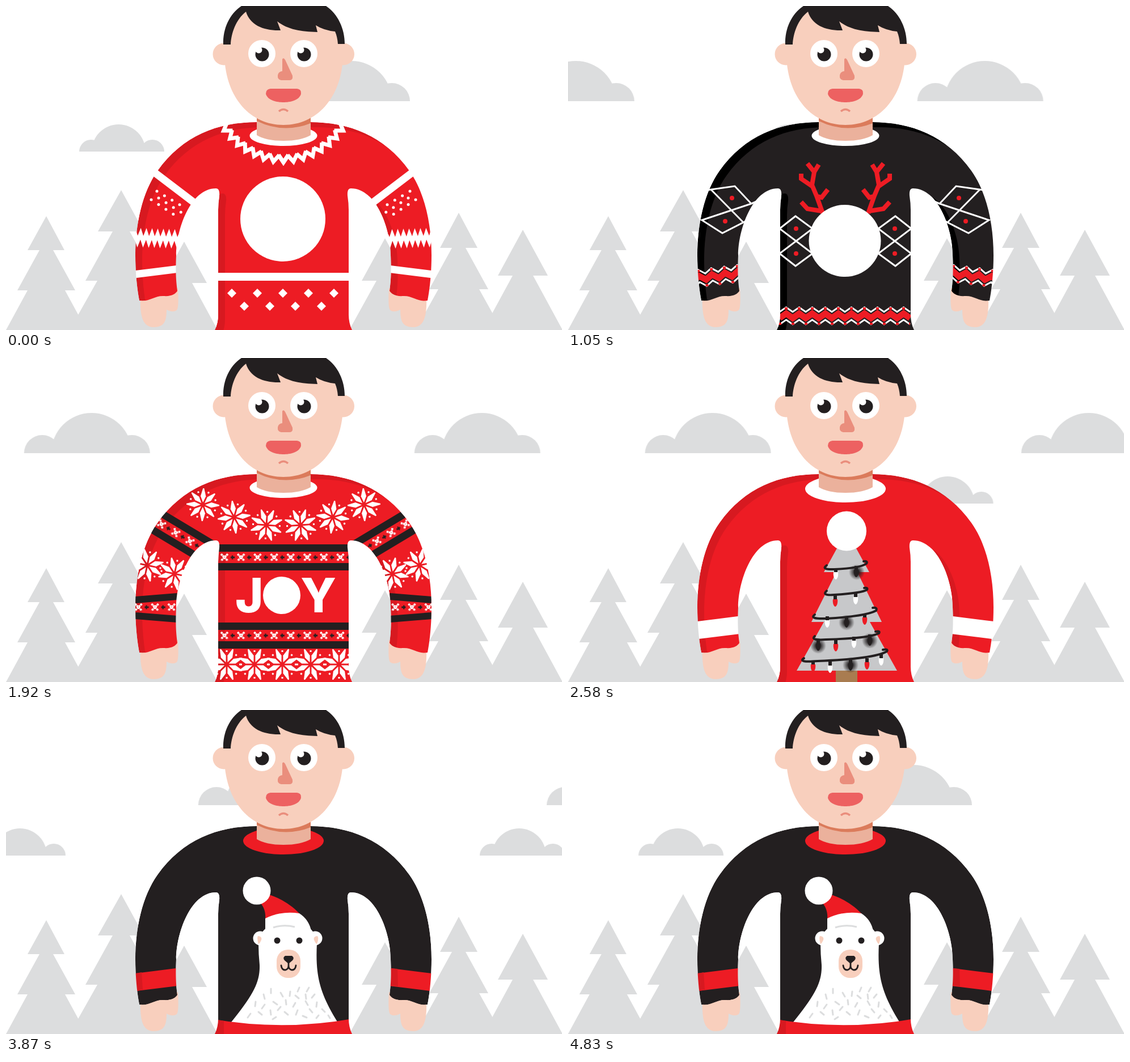
Recreate the animation shown at these times as an HTML page without scripts. Size 980 px wide and 572 px high, loop 4860 ms.

```html
<!DOCTYPE html>
<html lang="en">
<head>
<meta charset="utf-8">
<title>Festive sweaters</title>
<style>
html, body { margin: 0; height: 100%; overflow: hidden; background: #fff; }
svg { display: block; width: 100vw; height: 100vh; }
text { font-family: Inter, sans-serif; font-weight: 800; fill: #fff; }
.mirror { transform: matrix(-1, 0, 0, 1, 978, 0); }
.line { fill: none; stroke: #fff; }
.red { fill: #ed1c24; }
.black { fill: #231f20; }

/* Clouds advance in 30 ms steps */
.cloud { animation: drift 4.86s steps(162) infinite; transform: translateX(var(--from)); }
@keyframes drift {
  from { transform: translateX(var(--from)); }
  to { transform: translateX(var(--to)); }
}

/* Wardrobe: hard cuts */
.sweater { clip-path: url(#outline); animation: 4.86s step-end infinite; }
#ring { animation-name: ring; }
#hat { animation-name: hat; }
#antlers { animation-name: antlers; }
#joy { animation-name: joy; }
#fir { animation-name: fir; }
#bear { animation-name: bear; }
@keyframes ring { 0% { visibility: visible } 9.25%, 100% { visibility: hidden } }
@keyframes hat { 0% { visibility: hidden } 9.25% { visibility: visible } 18.51%, 100% { visibility: hidden } }
@keyframes antlers { 0% { visibility: hidden } 18.51% { visibility: visible } 37.03%, 100% { visibility: hidden } }
@keyframes joy { 0% { visibility: hidden } 37.03% { visibility: visible } 46.29%, 100% { visibility: hidden } }
@keyframes fir { 0% { visibility: hidden } 46.29% { visibility: visible } 72.22%, 100% { visibility: hidden } }
@keyframes bear { 0% { visibility: hidden } 72.22%, 100% { visibility: visible } }

#glow { animation: glow .54s infinite; }
@keyframes glow { 0%, 40% { opacity: .25 } 60%, 100% { opacity: 1 } }
.blink { transform-box: fill-box; transform-origin: center; animation: blink 4.86s step-end infinite; }
@keyframes blink { 0% { transform: none } 82.7% { transform: scaleY(.15) } 85.2%, 100% { transform: none } }
</style>
</head>
<body>
<svg viewBox="0 0 980 572" preserveAspectRatio="none">
<defs>
  <path id="half" d="M490 205H442C373 205 311 229 267 291C240 329 228 385 228 440C228 470 231 500 235 520C252 523 262 511 278 512C292 513 299 508 302 503C299 480 299 465 300 440C300 395 325 322 370 322Q377 322 376 335Q374 348 374 360V545Q374 560 368 572H490Z"/>
  <g id="body"><use href="#half"/><use href="#half" class="mirror"/></g>
  <clipPath id="outline"><use href="#half"/><use href="#half" class="mirror"/></clipPath>
  <g id="redBase"><use href="#body" fill="#d71920"/><use href="#body" x="12" y="9" class="red"/></g>
  <g id="blackBase"><use href="#body"/><use href="#body" x="12" y="9" class="black"/></g>
  <ellipse id="collar" cx="489" cy="229" rx="59.5" ry="18"/>
  <ellipse id="wideCollar" cx="489" cy="231" rx="71" ry="24"/>
  <path id="cuffBand" d="M225 481L305 471" stroke-width="31"/>

  <path id="bigCloud" d="M0 168a32 32 0 0 1 64 0M48 168a71 71 0 0 1 142 0M158 168a32 32 0 0 1 64 0"/>
  <path id="smallCloud" d="M0 257a21 21 0 0 1 42 0M22 257a47.5 48 0 0 1 95 0M108 257a21 21 0 0 1 42 0"/>

  <!-- Doubling chains build the collar teeth and the star -->
  <path id="tooth" d="M-8.7 114L0 127 8.7 114"/>
  <g id="teeth2"><use href="#tooth"/><use href="#tooth" transform="rotate(8)"/></g>
  <g id="teeth4"><use href="#teeth2"/><use href="#teeth2" transform="rotate(16)"/></g>
  <g id="teeth8"><use href="#teeth4"/><use href="#teeth4" transform="rotate(32)"/></g>
  <g id="petals"><path d="M0-4L4.700-15 1-29H-1L-4.700-15Z" transform="rotate(22.5)"/><path d="M-1.500-25h3v3h-3z"/></g>
  <g id="petals2"><use href="#petals"/><use href="#petals" transform="rotate(45)"/></g>
  <g id="petals4"><use href="#petals2"/><use href="#petals2" transform="rotate(90)"/></g>
  <g id="star" fill="#fff"><use href="#petals4"/><use href="#petals4" transform="rotate(180)"/></g>

  <path id="miniTree" fill="#fff" d="M0-34L12-13 8-12 18 9 13 11 23 32Q0 36-23 33L-13 11-18 10-8-12-12-13Z"/>
  <path id="wave" d="M0 4l11.5-8 11.5 8 11.5-8 11.5 8 11.5-8 11.5 8 11.5-8 11.5 8 11.5-8 11.5 8 11.5-8 11.5 8 11.5-8 11.5 8 11.5-8 11.5 8 11.5-8 11.5 8 11.5-8 11.5 8"/>
  <g id="waves" class="line">
    <use href="#wave" stroke="#ed1c24" stroke-width="11"/>
    <use href="#wave" y="-11" stroke-width="3"/>
    <use href="#wave" y="11" stroke-width="3"/>
    <path d="M9-13H230" stroke="#ed1c24" stroke-width="4" stroke-dasharray="5 18"/>
    <path d="M-2 14H230" stroke="#ed1c24" stroke-width="4" stroke-dasharray="5 18"/>
  </g>
  <pattern id="stitches" x="-118" y="-8" width="29.2" height="16" patternUnits="userSpaceOnUse">
    <path d="M8 2l12 12M20 2L8 14" stroke="#fff" stroke-width="3.6" stroke-dasharray="3.4 .8"/>
    <path d="M25 8h7M28.5 4.5v7M0 8h3" stroke="#231f20" stroke-width="3"/>
  </pattern>
  <rect id="stitchRow" x="-116" y="-8" width="232" height="16" fill="url(#stitches)"/>
  <g id="band"><path class="black" d="M-116-23h232v13h-232zM-116 10h232v13h-232z"/><use href="#stitchRow"/></g>

  <g id="bulb"><path d="M-4-2Q0-5 4-2C5 4 3 10 0 11C-3 10-5 4-4-2Z"/><path class="black" d="M-3-9h6v7h-6z"/></g>
  <radialGradient id="halo"><stop offset=".25" stop-color="#231f20"/><stop offset="1" stop-color="#231f20" stop-opacity="0"/></radialGradient>
  <path id="hand" fill="#f8cfbd" d="M237 510C236 540 238 567 260 567C280 567 283 555 283 536Q294 542 301 537Q305 532 303 498Z"/>
</defs>

<rect width="980" height="572" fill="#fff"/>
<g fill="#dcddde">
  <use href="#bigCloud" class="cloud" style="--from:490px;--to:1071.7px"/>
  <use href="#bigCloud" class="cloud" style="--from:-270.5px;--to:494.7px"/>
  <use href="#smallCloud" class="cloud" style="--from:129px;--to:1015.5px"/>
  <use href="#smallCloud" class="cloud" style="--from:-726px;--to:129.4px"/>
  <path d="M71 371L103 431H83L122 502H104L142 572H0L38 502H20L59 431H38Z"/>
  <path d="M203 325L243 398H218L266 485H245L294 572H112L161 485H140L188 398H162Z"/>
  <path d="M314 416L354 489H328L373 572H255L300 489H274Z"/>
  <path d="M668 410L709 485H683L731 572H605L653 485H627Z"/>
  <path d="M798 365L831 427H810L850 500H834L874 572H722L762 500H746L786 427H765Z"/>
  <path d="M911 395L955 476H929L981 572H841L893 476H867Z"/>
</g>
<use href="#hand"/><use href="#hand" class="mirror"/>

<g id="ring" class="sweater">
  <use href="#redBase"/>
  <use href="#collar" fill="#fff"/>
  <g class="line" stroke-width="7" transform="translate(489 149)">
    <use href="#teeth8" transform="rotate(-56)"/><use href="#teeth8"/>
  </g>
  <g id="ringSleeve" class="line">
    <path d="M258 291L342 355M225 474L305 464" stroke-width="13"/>
    <path d="M266 327l44 26M269 339l44 28M256 342l44 29" stroke-width="5" stroke-linecap="round" stroke-dasharray="0 15.5"/>
    <path d="M222 417l5-14 5 14 5-14 5 14 5-14 5 14 5-14 5 14 5-14 5 14 5-14 5 14 5-14 5 14 5-14 5 14 5-14" stroke-width="7" transform="rotate(2 265 410)"/>
  </g>
  <use href="#ringSleeve" class="mirror"/>
  <g fill="#fff">
    <circle cx="488" cy="376" r="75"/>
    <path d="M373 471H604V485H373Z"/>
    <path d="M390 507l8-8 8 8-8 8zm45 0l8-8 8 8-8 8zm45 0l8-8 8 8-8 8zm45 0l8-8 8 8-8 8zm45 0l8-8 8 8-8 8z"/>
    <path d="M412 530l8-8 8 8-8 8zm45 0l8-8 8 8-8 8zm45 0l8-8 8 8-8 8zm46 0l8-8 8 8-8 8z"/>
  </g>
</g>

<g id="hat" class="sweater">
  <use href="#redBase"/>
  <path id="vest" class="black" d="M490 200H349V220C364 245 373 285 373 322V545L366 572H490Z"/>
  <use href="#vest" class="mirror"/>
  <path d="M373 322Q382 318 385 322V545Q384 562 382 572H366L373 545Z"/>
  <use href="#collar" fill="#fff"/>
  <g id="hatSleeve">
    <use href="#miniTree" transform="translate(264 456) rotate(-3)"/>
    <use href="#miniTree" transform="translate(277 367) rotate(18)"/>
    <use href="#miniTree" transform="translate(324 289) rotate(45)"/>
  </g>
  <use href="#hatSleeve" class="mirror"/>
  <path class="red" d="M479 285C470 302 450 322 449 352H531C531 322 507 300 498 285Z"/>
  <g fill="#fff">
    <circle cx="488.5" cy="275" r="14"/>
    <path d="M445 348Q490 350 536 347Q541 348 540 354V365Q540 370 534 369Q490 367 446 370Q440 370 440 364V354Q440 349 445 348Z"/>
    <circle cx="518" cy="409" r="27"/><circle cx="518" cy="471.5" r="27"/><circle cx="518" cy="533.5" r="27"/>
  </g>
  <g font-size="66"><text x="437" y="433">H</text><text x="437" y="495">H</text><text x="437" y="557">H</text></g>
</g>

<g id="antlers" class="sweater">
  <use href="#blackBase"/>
  <use href="#collar" fill="#fff"/>
  <g id="antlerSide">
    <path d="M449 366L438 335 430 316 434 293 422 278M434 293L442 280M430 318L411 305V296M438 336L447 338 458 324M447 362L422 358 411 346" fill="none" stroke="#ed1c24" stroke-width="8"/>
    <path class="line" stroke-width="3" d="M373 393L401 371 431 393 373 437 401 459 431 437Z"/>
    <path class="line" stroke-width="3" d="M245 325L294 318 323 349 236 378 272 401 309 382 252 324M323 349L372 328M309 382L320 376"/>
    <g class="red"><circle cx="402" cy="393" r="4"/><circle cx="402" cy="437" r="4"/><circle cx="289" cy="339" r="4"/><circle cx="277" cy="380" r="4"/></g>
    <svg x="220" y="440" width="90" height="70"><use href="#waves" transform="translate(0 42) rotate(-7)"/></svg>
  </g>
  <use href="#antlerSide" class="mirror"/>
  <circle cx="488" cy="414.5" r="63.5" fill="#fff"/>
  <svg x="368" y="520" width="241" height="52"><use href="#waves" x="5" y="27"/></svg>
</g>

<g id="joy" class="sweater">
  <use href="#redBase"/>
  <use href="#collar" fill="#fff"/>
  <g id="joySide">
    <use href="#star" transform="translate(347 259) rotate(25)"/>
    <use href="#star" transform="translate(402 281) rotate(16)"/>
    <use href="#star" transform="translate(459 295) rotate(4)"/>
    <use href="#star" transform="translate(249 366) rotate(12)"/>
    <use href="#star" transform="translate(297 381) rotate(12)"/>
    <svg x="220" y="250" width="153" height="115"><use href="#band" transform="translate(93 67) rotate(31)"/></svg>
    <path d="M228 427L302 421M228 455L302 461" stroke="#231f20" stroke-width="12"/>
    <svg x="225" y="430" width="80" height="20"><use href="#stitchRow" x="54" y="10"/></svg>
  </g>
  <use href="#joySide" class="mirror"/>
  <use href="#band" x="489" y="352"/>
  <use href="#band" x="489" y="490"/>
  <g><use href="#star" x="389" y="541"/><use href="#star" x="438" y="541"/><use href="#star" x="487" y="541"/><use href="#star" x="537" y="541"/><use href="#star" x="587" y="541"/></g>
  <circle cx="486" cy="419" r="33" fill="#fff"/>
  <g font-size="84"><text x="404" y="449">J</text><text x="519" y="449">Y</text></g>
</g>

<g id="fir" class="sweater">
  <use href="#redBase"/>
  <use href="#wideCollar" fill="#fff"/>
  <g class="line"><use href="#cuffBand"/><use href="#cuffBand" class="mirror"/></g>
  <path fill="#a97c50" d="M472 550H510V572H472Z"/>
  <path fill="#c7c8ca" d="M491 305L531 378H510L553 466H532L580 552H403L451 466H429L473 378H451Z"/>
  <g id="glow" fill="url(#halo)">
    <circle cx="509" cy="378" r="14"/><circle cx="491" cy="467" r="14"/><circle cx="441" cy="508" r="14"/><circle cx="532" cy="499" r="14"/><circle cx="498" cy="542" r="14"/>
  </g>
  <g fill="none" stroke="#231f20" stroke-width="4" stroke-linecap="round">
    <path d="M456 366Q445 374 470 373Q515 371 526 363Q529 358 521 359"/>
    <path d="M456 411Q446 420 470 418Q518 415 527 409Q529 405 522 406"/>
    <path d="M435 453Q424 461 455 460Q525 456 543 446Q546 440 537 441"/>
    <path d="M435 491Q426 499 455 497Q530 495 548 486Q551 481 542 483"/>
    <path d="M416 530Q404 538 440 535Q540 531 562 518Q565 513 555 515"/>
  </g>
  <g class="black"><use href="#bulb" x="508" y="376"/><use href="#bulb" x="491" y="465"/><use href="#bulb" x="441" y="506"/><use href="#bulb" x="532" y="497"/><use href="#bulb" x="498" y="541"/></g>
  <g class="red"><use href="#bulb" x="471" y="428"/><use href="#bulb" x="523" y="460"/><use href="#bulb" x="472" y="507"/><use href="#bulb" x="432" y="543"/><use href="#bulb" x="527" y="539"/></g>
  <g fill="#fff"><use href="#bulb" x="472" y="380"/><use href="#bulb" x="507" y="424"/><use href="#bulb" x="457" y="465"/><use href="#bulb" x="504" y="501"/><use href="#bulb" x="462" y="545"/><use href="#bulb" x="552" y="532"/></g>
  <circle cx="491" cy="305.5" r="35" fill="#fff"/>
</g>

<g id="bear" class="sweater">
  <use href="#body" class="black"/>
  <use href="#wideCollar" class="red"/>
  <g stroke="#ed1c24"><use href="#cuffBand"/><use href="#cuffBand" class="mirror"/></g>
  <path d="M229 465l10-2 2 31-10 2zM679 456l11 1 1 31-13-2z" fill="#d71920"/>
  <g fill="#fff">
    <circle cx="448" cy="403" r="12.5"/><circle cx="545" cy="403" r="12.5"/>
    <path d="M445 412C446 386 470 374 497 374C525 374 547 386 548 412C545 470 553 500 585 552Q490 566 397 551C436 503 448 480 447 450Q445 430 445 412Z"/>
  </g>
  <path fill="#f8cfbd" d="M444 399Q452 400 450 406Q447 413 445 413Q442 403 444 399ZM549 399Q541 400 543 406Q546 413 548 413Q552 403 549 399Z"/>
  <path class="red" d="M448 340C456 349 458 360 457 369Q485 356 518 360C500 341 480 331 463 326Z"/>
  <path fill="#fff" d="M457 368Q485 354 517 359Q534 370 538 390H457Z"/>
  <path d="M471 384Q490 378 509 383" fill="none" stroke="#dcddde" stroke-width="3"/>
  <circle cx="442" cy="319" r="24.5" fill="#fff"/>
  <g class="black"><circle class="blink" cx="478" cy="407" r="5.5"/><circle class="blink" cx="517" cy="407" r="5.5"/></g>
  <rect x="477" y="423" width="42" height="50" rx="20" fill="#f8cfbd"/>
  <path class="black" d="M492 434H504Q509 437 505 442L498 448 491 442Q487 437 492 434Z"/>
  <path d="M498 445V452M485 451Q486 459 492 459Q498 458 498 451Q498 458 504 459Q510 459 511 451" fill="none" stroke="#231f20" stroke-width="2.8" stroke-linecap="round"/>
  <path d="M467 492v8M484 499l4 7M501 497l-1 8M517 490l-3 7M534 490l-4 7M454 502l2 8M471 515l7 5M493 512l1 8M510 504l6 5M528 502l1 8M544 502l-5 6M440 515l-1 8M456 520l-5 7M484 524l-5 6M510 517l-4 7M528 514l4 7M548 516l-1 8M431 536l-5 7M445 533l6 5M466 530l1 8M491 533l6 5M514 530l-3 8M535 528l5 6M557 528l5 5M476 542l-6 4M523 540l7 3M551 539l-4 5M568 539l3 5" stroke="#dcddde" stroke-width="3" stroke-linecap="round"/>
  <path class="red" d="M366 546Q489 567 611 545V572H366Z"/>
  <path d="M366 546L384 549V572H366Z" fill="#d71920"/>
</g>

<g id="head">
  <path fill="#ebb19c" d="M442 190H537V228Q520 238 489 238Q458 238 442 228Z"/>
  <path fill="#db7b5b" d="M442 190V203Q489 226 537 207V190Z"/>
  <g fill="#f8cfbd">
    <circle cx="384" cy="85" r="19.5"/><circle cx="594.5" cy="85" r="19.5"/>
    <path d="M420 5H560L594 67V90C591 163 547 210 489 210C431 210 388 163 385 90V67Z"/>
  </g>
  <path class="black" d="M383 68C382 40 394 14 415 0H564C585 14 597 40 597 67H585Q584 54 580 45Q560 43 546 34L549 46C520 45 497 42 478 27L484 43C455 44 430 34 423 10C405 24 397 48 396 68Z"/>
  <g id="eye"><circle cx="451" cy="84" r="24" fill="#fff"/><circle cx="451.5" cy="85.5" r="12" class="black"/><circle cx="445.5" cy="77.5" r="6" fill="#fff"/></g>
  <use href="#eye" x="74"/>
  <path fill="#ea8e7d" d="M487 94Q489 90 492 95L505 123Q506 131 500 131H485Q478 130 479 122Q480 116 487 115Z"/>
  <path fill="#ed6161" d="M466 146H513Q521 147 520 155C517 167 500 170 489 170C478 170 461 167 458 155Q458 147 466 146Z"/>
  <path d="M481 186Q489 179 497 186" fill="none" stroke="#ea8e7d" stroke-width="3.5"/>
</g>
</svg>
</body>
</html>
```
